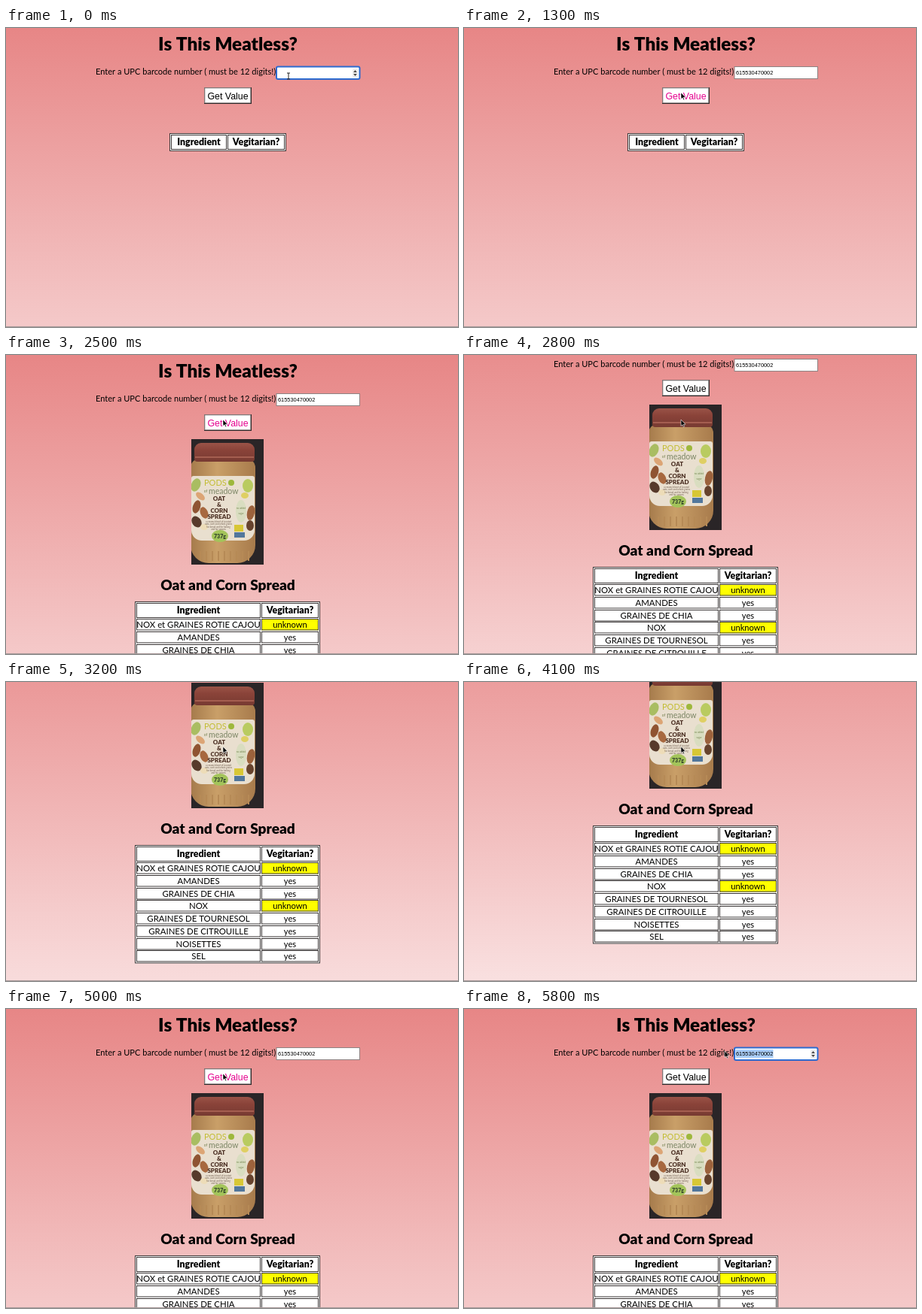
Recreate the animation shown at these times as an HTML page with a canvas. Size 600 by 398 pixels, loop 5900 ms.

```html
<!DOCTYPE html>
<html lang="en">
<head>
<meta charset="utf-8">
<title>Ingredient checker</title>
<style>
  html, body { margin: 0; width: 100%; height: 100%; overflow: hidden; }
  canvas { display: block; }
</style>
</head>
<body>
<canvas id="stage" width="600" height="398"></canvas>
<script>
const ctx = document.getElementById('stage').getContext('2d');
const LOOP = 5900, STEP = 100, PAGE_HEIGHT = 535;
const CODE = '615530470002';
const LINE = '#3a3636';
const ROWS = ['NOX et GRAINES ROTIE CAJOU', 'AMANDES', 'GRAINES DE CHIA', 'NOX',
  'GRAINES DE TOURNESOL', 'GRAINES DE CITROUILLE', 'NOISETTES', 'SEL'];

// Keys are [time, value, ...]
const POINTER = [[400, 375, 64], [1000, 288, 86], [5000, 288, 86],
  [5500, 414, 60], [5600, 414, 60], [5800, 346, 56]];
const SCROLL = [[2500, 0], [2600, 3], [2700, 20], [2800, 46], [2900, 71], [3000, 90],
  [3100, 103], [3200, 111], [3400, 124], [3600, 133], [3800, 137], [4100, 137],
  [4200, 112], [4300, 60], [4400, 20], [4500, 7], [4600, 2], [4700, 0]];

function sample(keys, t) {
  const next = keys.findIndex(k => k[0] > t);
  if (next === 0) return keys[0].slice(1);
  if (next < 0) return keys[keys.length - 1].slice(1);
  const a = keys[next - 1], b = keys[next];
  const u = (t - a[0]) / (b[0] - a[0]);
  return a.slice(1).map((v, i) => v + (b[i + 1] - v) * u);
}

const inside = (x, y, l, t, r, b) => x >= l && x <= r && y >= t && y <= b;

function text(str, x, y, font, color = '#000', align = 'center') {
  ctx.font = font;
  ctx.fillStyle = color;
  ctx.textAlign = align;
  ctx.fillText(str, x, y);
}

function rect(x, y, w, h, color) {
  ctx.fillStyle = color;
  ctx.fillRect(x, y, w, h);
}

function rounded(x, y, w, h, radii, color) {
  ctx.beginPath();
  ctx.roundRect(x, y, w, h, radii);
  ctx.fillStyle = color;
  ctx.fill();
}

function ellipse(x, y, rx, ry, color, angle = 0) {
  ctx.beginPath();
  ctx.ellipse(x, y, rx, ry, angle, 0, Math.PI * 2);
  ctx.fillStyle = color;
  ctx.fill();
}

function polygon(points, color) {
  ctx.beginPath();
  points.forEach(([x, y]) => ctx.lineTo(x, y));
  ctx.closePath();
  ctx.fillStyle = color;
  ctx.fill();
}

function box(x, y, w, h, fill = '#fff') {
  rect(x, y, w, h, fill);
  ctx.strokeStyle = LINE;
  ctx.lineWidth = 1;
  ctx.strokeRect(x + 0.5, y + 0.5, w - 1, h - 1);
}

function background(scroll) {
  const g = ctx.createLinearGradient(0, -scroll, 0, PAGE_HEIGHT - scroll);
  g.addColorStop(0, '#e78686');
  g.addColorStop(1, '#f9e0e0');
  rect(0, 0, 600, 398, g);
}

function input(focused, spinner, filled, selected) {
  if (focused) {
    rounded(358, 50.5, 112.5, 18.5, 3, '#2c6bd0');
    rounded(360, 52.5, 108.5, 14.5, 1, '#fff');
  } else {
    rect(358.5, 51, 111.5, 17, '#8d8383');
    rect(359.5, 52, 109.5, 15, '#fff');
  }
  if (selected) rect(360.5, 54, selected, 11, '#a9cdf8');
  if (filled) text(CODE, 361, 62.3, '7.4px "Liberation Sans", Arial, sans-serif', '#000', 'left');
  if (spinner) {
    rounded(460, 54, 7, 12, 2, '#ececec');
    polygon([[461.2, 59], [463.5, 56], [465.8, 59]], '#444');
    polygon([[461.2, 61], [463.5, 64], [465.8, 61]], '#444');
  }
}

function button(hover) {
  rect(263, 79, 63, 22, '#2e2a2a');
  rect(263, 79, 62, 21, '#817777');
  rect(264.3, 80.3, 60, 19, '#fff');
  text('Get Value', 294.5, 94.5, '12.4px "Liberation Sans", Arial, sans-serif', hover ? '#e5058f' : '#000');
}

function tableHead(x, y, w, h, widths) {
  box(x, y, w, h);
  let left = x + 2;
  ['Ingredient', 'Vegitarian?'].forEach((label, i) => {
    box(left, y + 2, widths[i], 20);
    text(label, left + widths[i] / 2, y + 16, '900 12.4px Lato, sans-serif');
    left += widths[i] + 1;
  });
}

function resultTable() {
  tableHead(171, 328, 246, 157.5, [165, 76]);
  ROWS.forEach((name, i) => {
    const y = Math.round(351 + i * 16.75);
    const unknown = name.startsWith('NOX');
    box(173, y, 165, 15.5);
    box(339, y, 76, 15.5, unknown ? '#ffff00' : '#fff');
    text(name, 255.5, y + 12, '11.4px Lato, sans-serif');
    text(unknown ? 'unknown' : 'yes', 377, y + 12, '11.2px Lato, sans-serif');
  });
}

function jar() {
  ctx.save();
  ctx.beginPath();
  ctx.rect(246, 112, 96, 167);
  ctx.clip();
  rect(246, 112, 96, 167, '#2a2527');

  const butter = ctx.createLinearGradient(246, 0, 332, 0);
  butter.addColorStop(0, '#a67b4c');
  butter.addColorStop(0.4, '#c99f68');
  butter.addColorStop(1, '#a77a4b');
  rounded(245, 138, 86, 139, [12, 12, 24, 24], butter);
  for (let x = 257; x < 322; x += 8) rect(x, 261, 2, 13, '#b68a56');

  const lid = ctx.createLinearGradient(0, 116, 0, 146);
  lid.addColorStop(0, '#9c5549');
  lid.addColorStop(0.35, '#8a4339');
  lid.addColorStop(1, '#733830');
  rounded(250, 117, 80, 25, [9, 9, 4, 4], lid);
  rect(251, 135, 78, 2, '#a45e50');

  rounded(246, 161, 84, 86, [3, 3, 14, 14], '#e9dfcf');
  ellipse(252, 173, 6, 9, '#a9bd62', 0.4);
  ellipse(321, 174, 7, 9, '#b9cb60');
  ellipse(317, 187, 5, 4, '#dfcf63');
  ellipse(258, 188, 7, 4, '#dca575', 0.7);
  ellipse(253, 202, 5, 9, '#8f5432', 0.3);
  ellipse(263, 210, 5, 8, '#a7683f', -0.4);
  ellipse(253, 222, 6, 8, '#573a2b', -0.6);
  ellipse(263, 229, 5, 4, '#eddcb8');
  ellipse(325, 210, 5, 10, '#9c623c', 0.2);
  ellipse(324, 227, 5, 7, '#67432d');

  const tiny = '3px Lato, sans-serif';
  text('PODS', 263, 174, '11px Lato, sans-serif', '#c3bd35', 'left');
  ellipse(299, 170, 4, 4, '#9eb83c');
  text('of', 265, 183, '5px Lato, sans-serif', '#76804f');
  text('meadow', 269, 185, '10.5px Lato, sans-serif', '#7b8564', 'left');
  ['OAT', '&', 'CORN', 'SPREAD'].forEach((word, i) =>
    text(word, 283, 193.5 + i * 8.2, '900 8px Lato, sans-serif', '#4c3024'));
  ['a creamy blend of toasted', 'oats, corn and whole grains', 'for bread and for baking', 'and for spoons'].forEach((line, i) =>
    text(line, 282, 222.5 + i * 3.6, tiny, '#756253'));

  ellipse(312, 208, 7, 15, '#d9ddc0');
  text('no added', 312, 205, tiny, '#75854f');
  text('sugar', 312, 212, tiny, '#75854f');
  rect(303, 226, 12, 9, '#d8c735');
  rect(303, 236, 14, 7, '#52779c');
  ellipse(284, 241, 11, 8, '#a3c45a');
  text('737g', 284, 244, '900 7px Lato, sans-serif', '#30402a');
  ctx.restore();
}

function pointer(x, y, beam) {
  if (beam) {
    rect(x - 0.5, y - 4, 1, 8, '#222');
    rect(x - 2, y - 4.5, 4, 1, '#222');
    rect(x - 2, y + 3.5, 4, 1, '#222');
    return;
  }
  const arrow = [[0, 0], [0, 8.5], [2, 6.8], [3.3, 9.8], [4.6, 9.2], [3.3, 6.3], [6, 6.2]];
  polygon(arrow.map(([dx, dy]) => [x + dx, y + dy]), '#000');
  ctx.strokeStyle = '#fff';
  ctx.lineWidth = 0.6;
  ctx.stroke();
}

function draw(now) {
  const t = Math.floor((now % LOOP) / STEP) * STEP;
  const [px, py] = sample(POINTER, t);
  const [scroll] = sample(SCROLL, t);
  const overInput = inside(px, py, 359, 51, 470, 69);
  const overButton = scroll === 0 && inside(px, py, 263, 79, 326, 101);
  const focused = t < 1200 || t >= 5500;
  const selected = t < 5700 ? 0 : t < 5800 ? 30 : 50;

  background(scroll);
  ctx.save();
  ctx.translate(0, -scroll);
  text('Is This Meatless?', 294.5, 30, '900 24.3px Lato, sans-serif');
  text('Enter a UPC barcode number ( must be 12 digits!)', 119, 62, '11.05px Lato, sans-serif', '#000', 'left');
  input(focused, focused || overInput, t >= 100, selected);
  button(overButton);
  if (t < 1500) {
    tableHead(217, 140, 155, 24, [74, 76]);
  } else {
    jar();
    text('Oat and Corn Spread', 294.5, 313, '900 19.1px Lato, sans-serif');
    resultTable();
  }
  ctx.restore();
  rect(0, 397, 600, 1, '#aa9b9b');
  pointer(px, py, overInput);
  requestAnimationFrame(draw);
}
requestAnimationFrame(draw);
</script>
</body>
</html>
```
